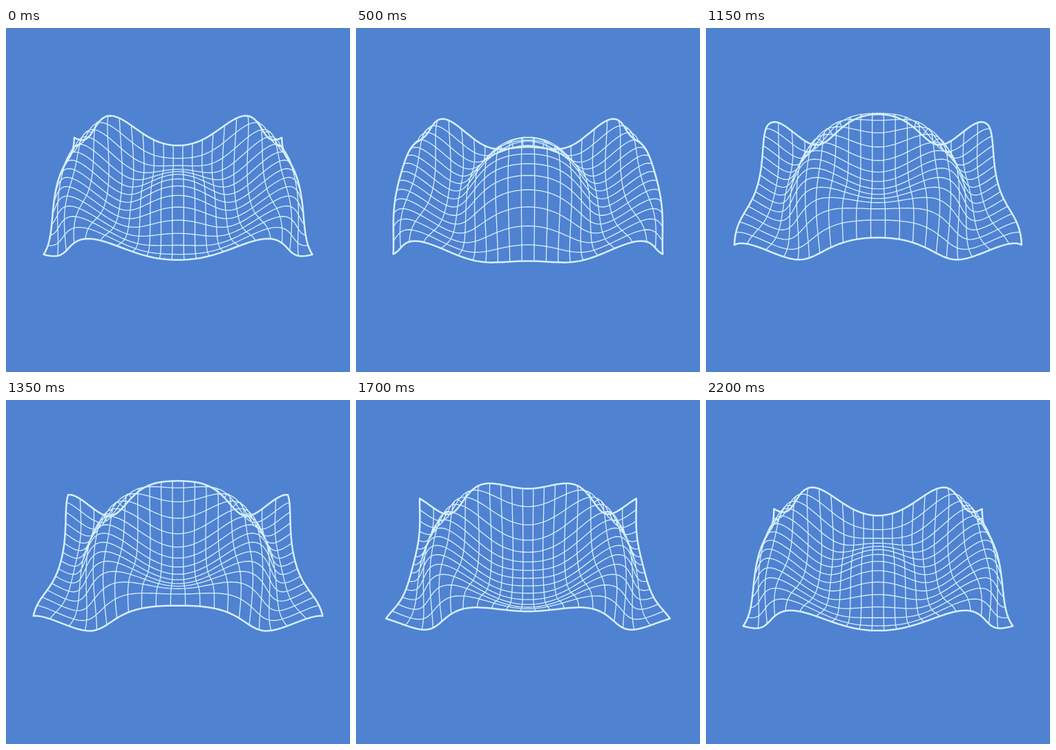
Recreate the animation shown at these times as an HTML page with a canvas. Size 498x498 px, loop 2.25 s.

```html
<!DOCTYPE html>
<html lang="en">
<head>
<meta charset="utf-8">
<title>Rippling mesh</title>
<style>
  html, body { margin: 0; width: 100%; height: 100%; overflow: hidden; background: #5082d2; }
  canvas { display: block; }
</style>
</head>
<body>
<canvas id="stage" width="498" height="498"></canvas>
<script>
const ctx = document.getElementById('stage').getContext('2d');
const SIZE = 498, LOOP = 2250, STEP = 50;
const COLS = 22, ROWS = 15, DEPTH = 0.6, SAMPLES = 90;
const FOCAL = 431.3, DISTANCE = 2.474, LIFT = 0.143;
const TILT = 57 * Math.PI / 180, SIN = Math.sin(TILT), COS = Math.cos(TILT);

// Outward ripple: phase grows with the squared radius, height fades with it
function height(x, y, time) {
  const r2 = x * x + y * y;
  const phase = (time - 605) / LOOP - 0.98 * r2;
  return 0.371 * Math.exp(-0.936 * r2) * Math.cos(2 * Math.PI * phase);
}

function project(x, y, time) {
  const h = height(x, y, time);
  const scale = FOCAL / (DISTANCE - COS * y - SIN * h);
  return [SIZE / 2 + scale * x, SIZE / 2 + scale * (SIN * y - COS * h - LIFT)];
}

function trace(pointAt) {
  for (let i = 0; i <= SAMPLES; i++) {
    const [x, y] = pointAt(2 * i / SAMPLES - 1);
    if (i) ctx.lineTo(x, y); else ctx.moveTo(x, y);
  }
}

const column = (u, time) => trace(s => project(u, s * DEPTH, time));
const row = (v, time) => trace(s => project(s, v * DEPTH, time));
const spread = (i, count) => 2 * i / (count - 1) - 1;

function draw(time) {
  ctx.fillStyle = '#5082d2';
  ctx.fillRect(0, 0, SIZE, SIZE);
  ctx.strokeStyle = '#d4f0fc';
  ctx.lineJoin = ctx.lineCap = 'round';

  ctx.lineWidth = 1.3;
  ctx.beginPath();
  for (let i = 1; i < COLS - 1; i++) column(spread(i, COLS), time);
  for (let i = 1; i < ROWS - 1; i++) row(spread(i, ROWS), time);
  ctx.stroke();

  ctx.lineWidth = 2.5;
  ctx.beginPath();
  for (const side of [-1, 1]) {
    column(side, time);
    row(side, time);
  }
  ctx.stroke();
}

const start = performance.now();
function tick() {
  const time = (performance.now() - start) % LOOP;
  draw(Math.floor(time / STEP) * STEP);
  requestAnimationFrame(tick);
}
tick();
</script>
</body>
</html>
```
